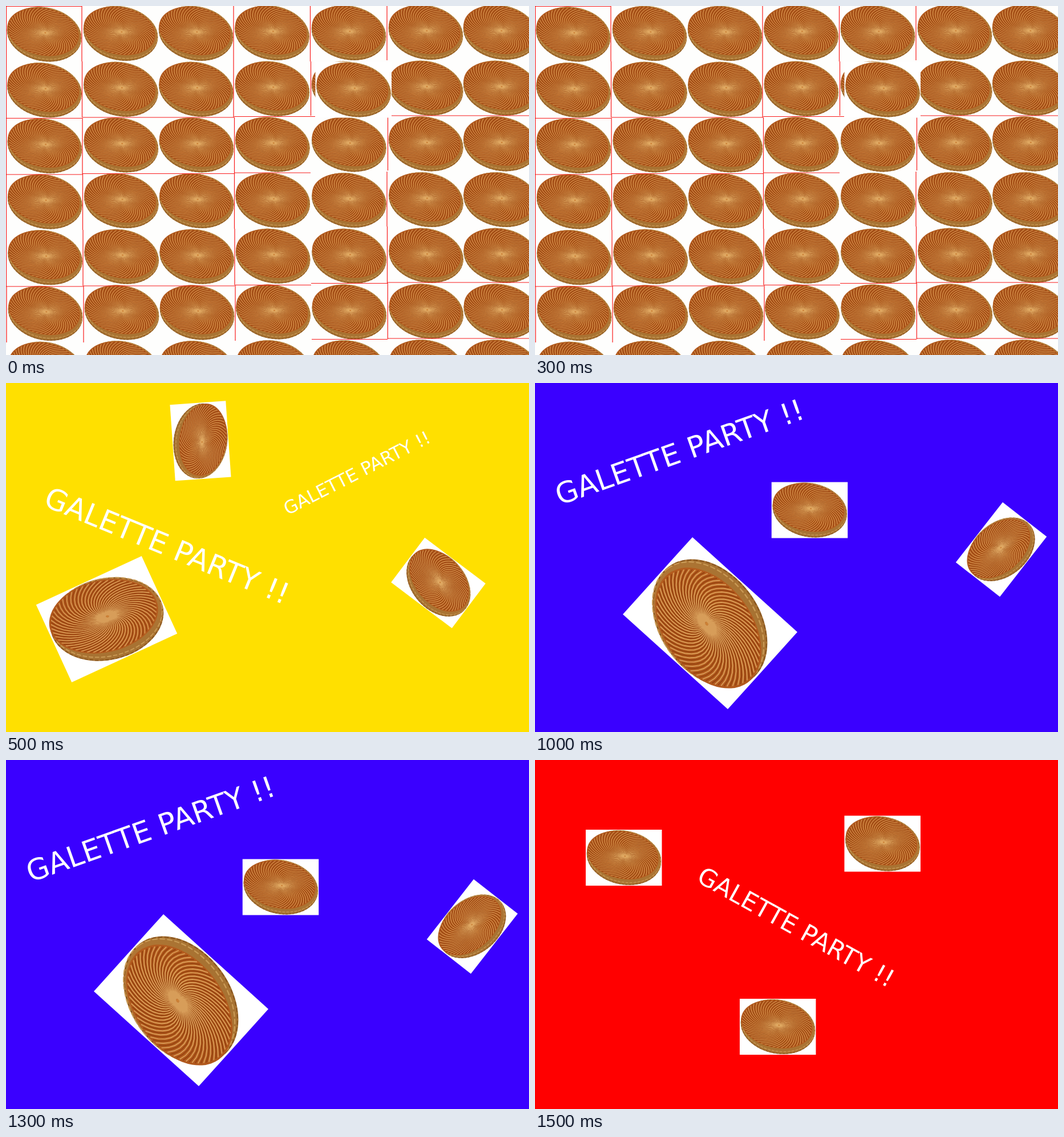
These frames come from a looping animation (917x611 px, 2 s). An HTML page:

```html
<!DOCTYPE html>
<html lang="fr">
<head>
<meta charset="utf-8">
<title>Galette party</title>
<style>
  html, body { margin: 0; width: 100%; height: 100%; overflow: hidden; background: #fff; }
  svg { display: block; width: 100vw; height: 100vh; }
  text { font-family: "DejaVu Sans", sans-serif; fill: #fff; text-anchor: middle; }
  .scene { visibility: hidden; animation: show 2s step-end calc(var(--i) * .5s - 2s) infinite; }
  @keyframes show {
    0% { visibility: visible; }
    25%, 100% { visibility: hidden; }
  }
</style>
</head>
<body>
<svg viewBox="0 0 917 611" preserveAspectRatio="none">
  <defs>
    <radialGradient id="crust" cx=".54" cy=".54" r=".58">
      <stop offset="0" stop-color="#cf8438"/>
      <stop offset=".45" stop-color="#b9601f"/>
      <stop offset="1" stop-color="#b0581d"/>
    </radialGradient>
    <linearGradient id="side" x1="0" y1="0" x2="0" y2="1">
      <stop offset="0" stop-color="#b87836"/>
      <stop offset="1" stop-color="#a67232"/>
    </linearGradient>
    <g id="pie" fill="none">
      <g transform="translate(67 49) rotate(12)">
        <ellipse rx="66" ry="47" fill="url(#side)"/>
        <ellipse rx="65.2" ry="46.2" stroke="#8a5720" stroke-width="1.2" stroke-dasharray="4 2"/>
        <ellipse cy="-2" rx="65" ry="44.6" stroke="#c99a55" stroke-width="1.2" stroke-dasharray="5 2"/>
      </g>
      <ellipse rx="63.5" ry="41.5" fill="url(#crust)" transform="translate(65 44.5) rotate(12)"/>
      <path id="dark" stroke="#8e3c0c" stroke-width="1.1" stroke-opacity=".75"/>
      <path id="light" stroke="#e2ac66" stroke-width=".9" stroke-opacity=".85"/>
    </g>
    <g id="card">
      <path d="M0 0H133.5V98H0Z" fill="#fff"/>
      <use href="#pie"/>
    </g>
  </defs>

  <g class="scene" style="--i:0">
    <path d="M0 0H917V611H0Z" fill="#fefefd"/>
    <g id="grid"></g>
    <path fill="none" stroke="#f81c1c" stroke-width="1.2" d="
      M0 .5H133V97M133.5 97V195M134 196V294M134.5 294V392M135 392V490M136 490V589
      M.5 0V491M1 491V589
      M399 0V195M400.5 195V390M401 390V489M402 489V586
      M533.5 0V97M534.5 97V192M668 0V95M669.5 195V288M668 290V386M668.5 386V485M669.3 485V583
      M0 196.5H134M134 195H400M400 193.5H542M676 192H917
      M0 295H134M134 293.5H400M400 292H534
      M0 491H136M136 490H401M402 488.5H535M535 485.5H669M669 484H917
      M536 583.5H669M669 582H917"/>
    <use href="#card" x="542.5" y="97.5"/>
  </g>
  <g class="scene" id="yellow" style="--i:1"></g>
  <g class="scene" id="blue" style="--i:2"></g>
  <g class="scene" id="red" style="--i:3"></g>
</svg>
<script>
  const $ = id => document.getElementById(id);

  // Curved scores running clockwise from the hub to the edge of the crust
  function swirl(count, shift) {
    const tilt = 12 * Math.PI / 180, c = Math.cos(tilt), s = Math.sin(tilt);
    let d = '';
    for (let i = 0; i < count; i++) {
      const start = (i + shift) / count * 2 * Math.PI;
      for (let k = 0; k <= 10; k++) {
        const t = .03 + k * .094, a = start + 1.35 * t;
        const u = 63.5 * t * Math.cos(a), v = 41.5 * t * Math.sin(a);
        const x = 69 - 4 * t + u * c - v * s;
        const y = 46.5 - 2 * t + u * s + v * c;
        d += (k ? 'L' : 'M') + x.toFixed(1) + ' ' + y.toFixed(1);
      }
    }
    return d;
  }
  $('light').setAttribute('d', swirl(52, 0));
  $('dark').setAttribute('d', swirl(52, .5));

  const columns = [[0, .5], [134, -1], [266, -1], [399.5, -2], [534, -2], [669, -3], [800, -3]];
  $('grid').innerHTML = columns.map(([x, y]) => {
    const drift = x < 500 ? .4 : .15;
    return Array.from({ length: 7 }, (_, r) =>
      `<use href="#pie" x="${x + r * drift}" y="${y + r * 97.7}"/>`).join('');
  }).join('');

  const card = (x, y, angle = 0, size = 1) =>
    `<use href="#card" transform="translate(${x} ${y}) rotate(${angle}) scale(${size}) translate(-66.75 -49)"/>`;
  const shout = (x, y, angle, size) =>
    `<text transform="translate(${x} ${y}) rotate(${angle})" font-size="${size}" x="${-.1 * size}" y="${.365 * size}">GALETTE PARTY !!</text>`;
  const fill = (id, color, ...parts) =>
    $(id).innerHTML = `<path d="M0 0H917V611H0Z" fill="${color}"/>` + parts.join('');

  fill('yellow', '#ffe000',
    card(341, 101.3, 86), card(758, 350, 37), card(176.5, 413.5, -24.7, 1.525),
    shout(287.5, 286, 22.3, 51), shout(617.8, 155.5, -27, 31.6));
  fill('blue', '#3a00ff',
    card(481.5, 222.5), card(817.5, 291.5, -52), card(307, 420.5, 222.1, 1.857),
    shout(258, 118.5, -19.5, 51));
  fill('red', '#f00',
    card(155.7, 171), card(609.2, 146.5), card(425.7, 467),
    shout(462, 294, 29, 43));
</script>
</body>
</html>
```
